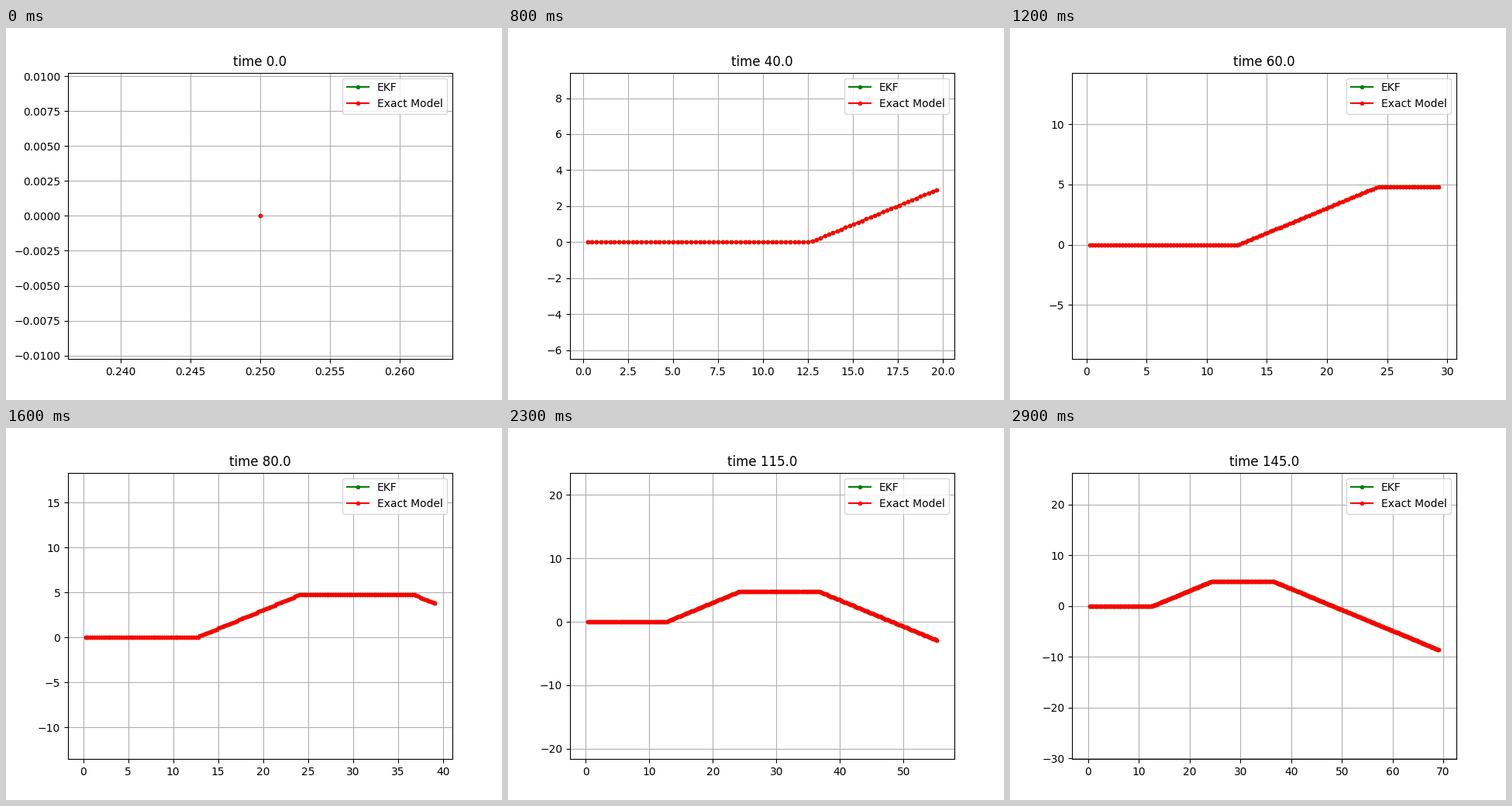
Write a matplotlib script that moves like this. It is 640 px wide and 480 px high and loops after 3 s.

```python
import numpy as np
import matplotlib.pyplot as plt
from matplotlib.animation import FuncAnimation

FRAMES = 30
INTERVAL = 100      # ms
TIME_PER_FRAME = 5  # simulated time units
DT = 0.5
SPEED = 0.5
TURN = np.pi / 8    # heading change of a single turning step
LEG = 50            # steps between turns

# Heading before each step; a turning step follows the chord of its arc.
steps = np.arange(int(FRAMES * TIME_PER_FRAME / DT))
turns = np.zeros(len(steps))
turns[[LEG, 2 * LEG, 3 * LEG]] = TURN, -TURN, -TURN
heading = np.cumsum(turns) - turns / 2
chord = SPEED * DT * np.sinc(turns / (2 * np.pi))

xs = np.cumsum(chord * np.cos(heading))
ys = np.cumsum(chord * np.sin(heading))

fig, ax = plt.subplots(figsize=(6.4, 4.8), dpi=100)


def draw(frame):
    time = float(frame * TIME_PER_FRAME)
    count = int(time / DT) + 1
    ax.cla()
    for color, label in (("g", "EKF"), ("r", "Exact Model")):
        ax.plot(xs[:count], ys[:count], ".-" + color, label=label)
    ax.axis("equal")
    ax.grid(True)
    ax.set_title(f"time {time}")
    ax.legend(loc="upper right")
    return ax.lines


anim = FuncAnimation(fig, draw, frames=FRAMES, interval=INTERVAL,
                     init_func=lambda: draw(0), repeat=True, repeat_delay=0)
plt.show()
```
